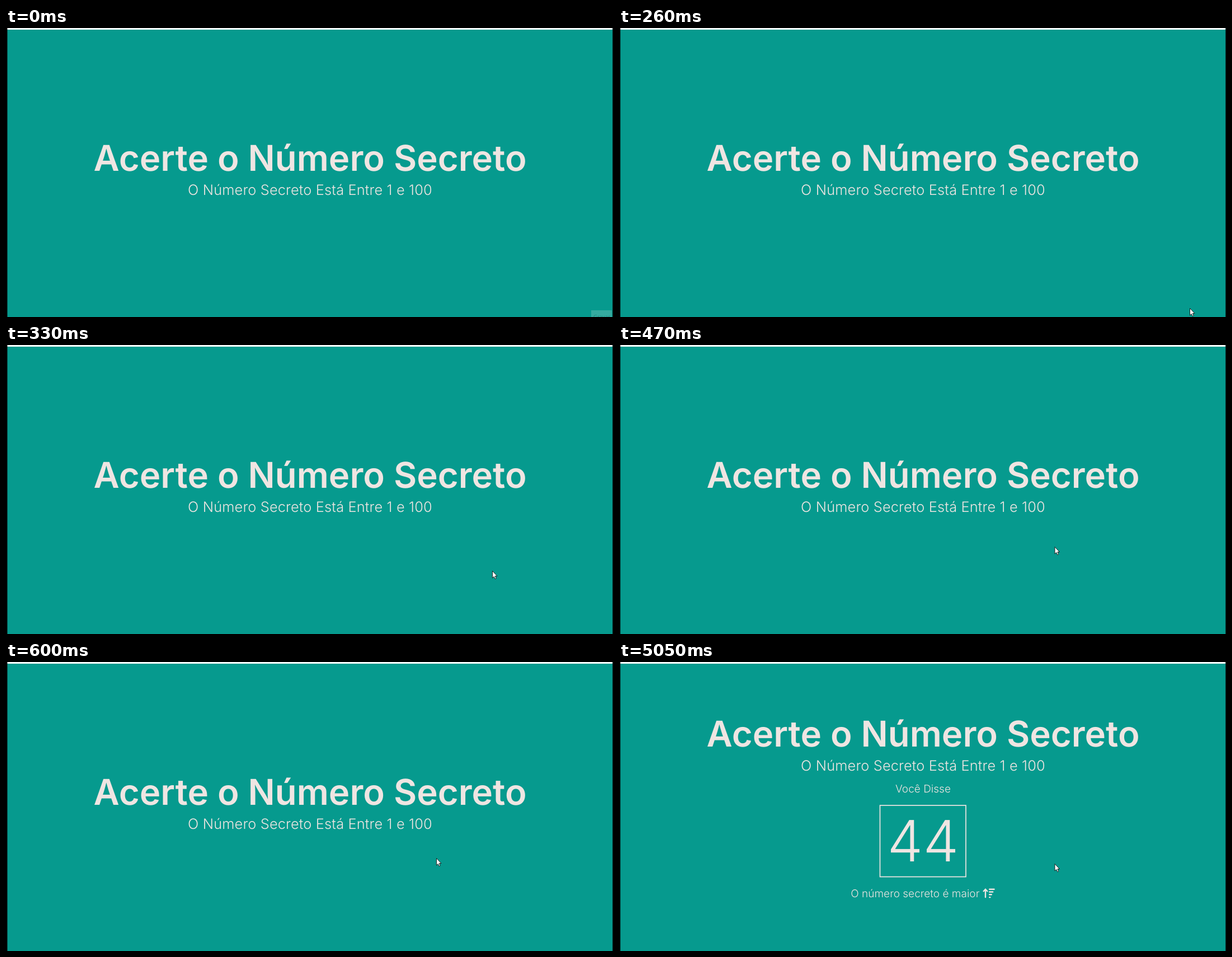
These frames come from a looping animation (1085 px wide and 516 px high, 8 s). An HTML page:

```html
<!DOCTYPE html>
<html lang="pt">
<head>
<meta charset="utf-8">
<title>Acerte o Número Secreto</title>
<style>
  html, body { margin: 0; width: 100%; height: 100%; overflow: hidden; background: #069a8e; }
  svg { display: block; width: 1085px; height: 516px; }
  text {
    font-family: Inter, sans-serif; font-weight: 300; fill: #efe5e2;
    text-anchor: middle; text-rendering: geometricPrecision;
  }
  .title { font-size: 63.5px; font-weight: 600; }
  .sub { font-size: 25.4px; letter-spacing: .14px; }
  .small { font-size: 19.05px; }
  .guess { font-size: 101.6px; }
  .start { text-anchor: start; }
  .tip { font: 9.5px "Open Sans", sans-serif; fill: #16867b; text-anchor: start; }
  .line { fill: none; stroke: #efe5e2; }
</style>
</head>
<body>
<svg viewBox="0 0 1085 516">
  <rect width="1085" height="516" fill="#069a8e"/>
  <rect width="1085" height="3" fill="#fff"/>
  <rect width="2.4" height="516" fill="#000"/>
  <rect x="1084" width="1" height="516" fill="#04201e"/>

  <g id="heading">
    <text class="title" x="543.5" y="255">Acerte o Número Secreto</text>
    <text class="sub" x="543.5" y="298">O Número Secreto Está Entre 1 e 100</text>
  </g>

  <g id="result">
    <text class="small" x="543.5" y="233">Você Disse</text>
    <rect class="line" x="466.5" y="256" width="153.5" height="127.5" stroke-width="1.7"/>
    <text class="guess" x="543.5" y="356">44</text>
    <text class="small start" x="414.3" y="420">O número secreto é maior</text>
    <path class="line" transform="translate(650.2 403.3) scale(.0375)" stroke-width="64"
      stroke-linecap="round" stroke-linejoin="round"
      d="M128 448V64M40 160L128 64L216 160M320 64H544M320 192H480M320 320H416M320 448H352"/>
  </g>

  <g id="tooltip">
    <rect x="1046" y="504" width="37" height="12" fill="#35aa9f"/>
    <text class="tip" x="1050" y="518.5">Gravar</text>
  </g>

  <path id="cursor" d="M.5 .5V13L3.3 10.4L5.1 14.6L7.2 13.7L5.4 9.6H9Z"
    fill="#fff" stroke="#111" stroke-width=".9"/>
</svg>
<script>
  const LOOP = 8000, TOOLTIP_END = 70, ANSWER = 5050;
  // start time, x, y of the pointer tip
  const pointer = [
    [260, 1020, 500],
    [330, 869, 403],
    [400, 806, 372],
    [470, 778.5, 360],
    [600, 769, 350],
    [730, 778.5, 360]
  ];

  const el = id => document.getElementById(id);
  const heading = el('heading'), result = el('result');
  const tooltip = el('tooltip'), cursor = el('cursor');
  const show = (node, on) => node.setAttribute('visibility', on ? 'visible' : 'hidden');
  const move = (node, x, y) => node.setAttribute('transform', `translate(${x} ${y})`);

  function draw(t) {
    const answered = t >= ANSWER;
    show(tooltip, t < TOOLTIP_END);
    show(result, answered);
    move(heading, 0, answered ? -104 : 0);

    const step = pointer.filter(p => p[0] <= t).pop();
    show(cursor, step);
    if (step) move(cursor, step[1], step[2]);
  }

  const origin = performance.now();
  function tick() {
    draw((performance.now() - origin) % LOOP);
    requestAnimationFrame(tick);
  }
  draw(0);
  requestAnimationFrame(tick);
</script>
</body>
</html>
```
